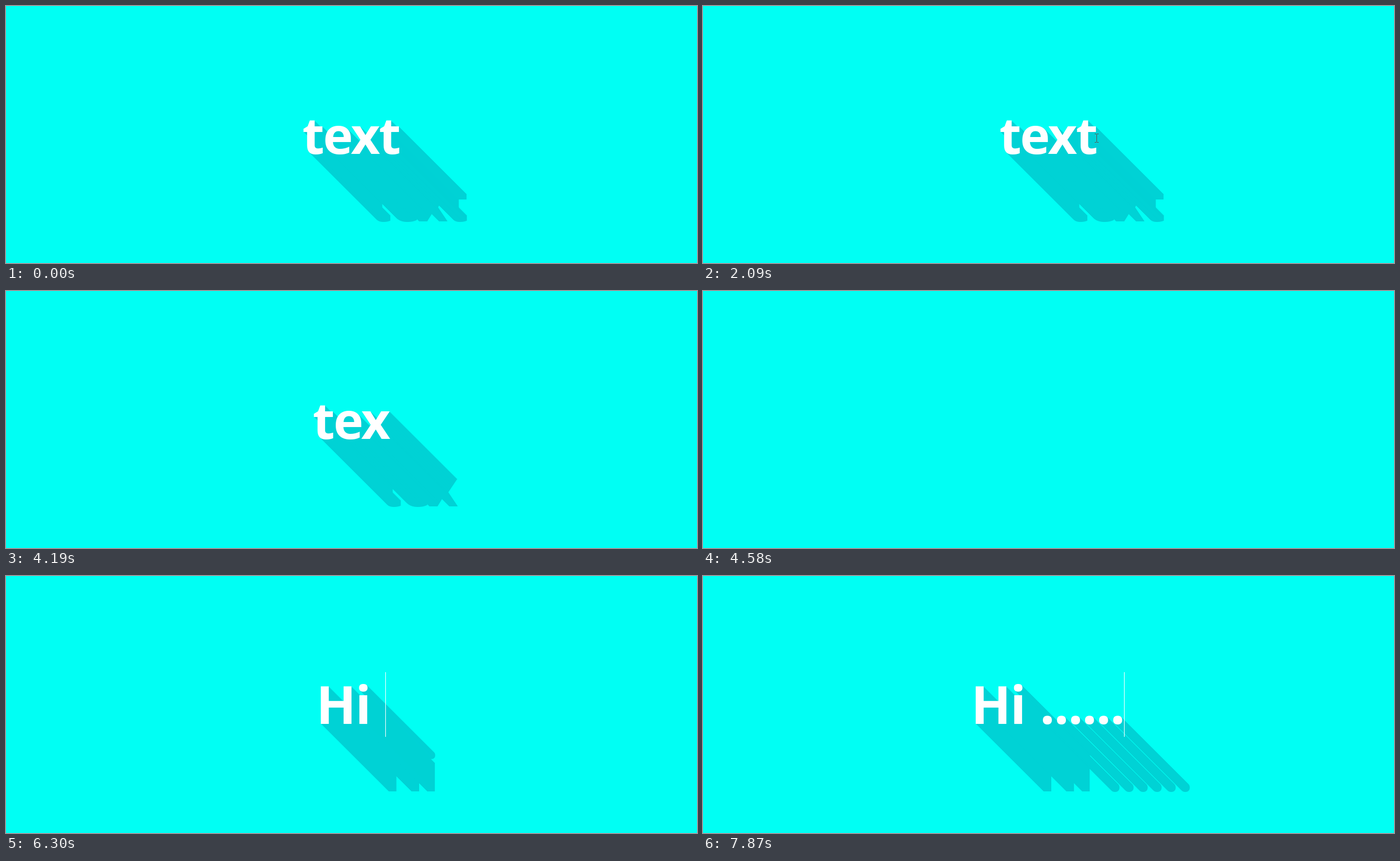
Recreate the animation shown at these times as an HTML page. Size 1226 px wide and 457 px high, loop 8000 ms.

```html
<!DOCTYPE html>
<html lang="en">
<head>
<meta charset="utf-8">
<title>Long shadow text</title>
<style>
  html, body { margin: 0; width: 100%; height: 100%; overflow: hidden; background: #00fff4; }
  #stage { position: relative; width: 1226px; height: 457px; overflow: hidden; background: #00fff4; }
  #word {
    position: absolute; left: -1px; top: calc(263.4px - .388em); width: 1226px;
    font: bold 90px/0 "Open Sans", "Noto Sans", sans-serif;
    letter-spacing: -2.3px; text-align: center; white-space: pre; color: #fff;
  }
  #word.greeting { left: -1.6px; font-size: 93px; letter-spacing: -1.6px; word-spacing: 3.5px; }
  #caret { position: absolute; top: 171px; width: 1px; height: 115px; background: #fff; }
  svg { position: absolute; left: 0; top: 0; }
  svg text { font-family: "Open Sans", "Noto Sans", sans-serif; }
  .bold { font-size: 18px; font-weight: bold; }
  .choice { font-size: 19.5px; }
  #more text { font: 14.6px "Noto Sans CJK SC", "Noto Sans CJK", sans-serif; }
</style>
</head>
<body>
<div id="stage">
  <div id="word"></div>
  <div id="caret"></div>
  <svg width="1226" height="457" fill="none">
    <g id="popup">
      <rect x="564.5" y="285.5" width="366" height="75" fill="#fff" stroke="#5b99a3"/>
      <path d="M565 321H893" stroke="#d2d2d2"/>
      <text class="bold" x="576" y="310" fill="#0a70bd">Hi</text>
      <path d="M596.5 291V315" stroke="#f0442c" stroke-width="1.5"/>
      <text class="bold" x="653" y="310" fill="#f76a12">[H'I]</text>
      <g id="more">
        <circle cx="771.5" cy="303" r="7.5" stroke="#fa7048" stroke-width="1.3"/>
        <path d="M771.5 298V300M770 302.5H771.5V307.5M769.5 307.5H774" stroke="#fa7048" stroke-width="1.6"/>
        <text x="785" y="308.5" fill="#1268cc">更多英文补全</text>
      </g>
      <rect x="894" y="286" width="36" height="36" fill="#fca58c"/>
      <text class="choice" x="577" y="348" fill="#f42417">1.Hi</text>
      <text class="choice" x="624" y="348" fill="#0a86d3">2.H</text>
      <path d="M876.5 336L871 341.5L876.5 347M888.5 336L894 341.5L888.5 347" stroke="#cfcfcf" stroke-width="2"/>
    </g>
    <path id="arrow" d="M.5 .5V16L4 12.6L6.6 18.5L9 17.5L6.4 11.7H11Z" fill="#fff" stroke="#000"/>
    <path id="beam" d="M-4 -7.5H-1M0 -7.5H3M-.5 -7V7M-4 7.5H-1M0 7.5H3" stroke="#5c5552"/>
  </svg>
</div>
<script>
  const LOOP = 8000;
  const $ = id => document.getElementById(id);
  const word = $("word"), caret = $("caret"), popup = $("popup"), more = $("more");
  const pointers = { arrow: $("arrow"), beam: $("beam") };

  word.style.textShadow =
    Array.from({ length: 120 }, (_, i) => `${i + 1}px ${i + 1}px #00d2d5`).join();

  // time, text, caret x (0 when hidden)
  const typing = [
    [0, "text", 0], [1630, "text", 698], [2090, "text", 0], [2640, "text", 698],
    [3100, "text", 0], [3640, "text", 698],
    [4190, "tex", 0], [4340, "te", 0], [4510, "t", 0], [4580, "", 0],
    [4830, "H", 648], [5050, "Hi", 659], [5600, "Hi", 0],
    [6060, "Hi ", 673], [6130, "Hi", 659], [6300, "Hi ", 673], [6760, "Hi ", 0]
  ];
  [7080, 7250, 7400, 7550, 7720, 7870].forEach((time, i) =>
    typing.push([time, "Hi " + ".".repeat(i + 1), Math.round(673 + 12.4 * (i + 1))]));

  // time, shape, x, y
  const mouse = [[0, ""], [320, "arrow", 592, 322], [390, ""]];
  const path = [
    [597, 345], [572, 400], [567, 432], [600, 425], [660, 385], [715, 350],
    [730, 320], [728, 290], [718, 262], [708, 242], [702, 228]
  ];
  path.forEach(([x, y], i) => mouse.push([620 + 78 * i, y < 286 ? "beam" : "arrow", x, y]));
  mouse.push(
    [1480, "beam", 690, 232], [1560, "beam", 704, 231], [1630, "beam", 699, 235],
    [3330, "arrow", 540, 140], [3410, ""]
  );

  const at = (list, t) => list.findLast(item => item[0] <= t);
  const show = (el, on) => { el.style.visibility = on ? "visible" : "hidden"; };

  function draw(t) {
    const [, text, caretX] = at(typing, t);
    if (word.textContent !== text) word.textContent = text;
    word.className = text[0] === "H" ? "greeting" : "";
    caret.style.left = caretX + "px";
    show(caret, caretX);

    popup.style.display = t >= 5050 && t < 6060 ? "" : "none";
    const step = Math.floor((t - 5450) / 75) + 1;
    more.style.opacity = Math.min(1, Math.max(0, step / 5));

    const [, shape, x, y] = at(mouse, t);
    for (const name in pointers) {
      show(pointers[name], name === shape);
      if (name === shape) pointers[name].setAttribute("transform", `translate(${x} ${y})`);
    }
  }

  const start = performance.now();
  function tick() {
    draw((performance.now() - start) % LOOP);
    requestAnimationFrame(tick);
  }
  tick();
</script>
</body>
</html>
```
